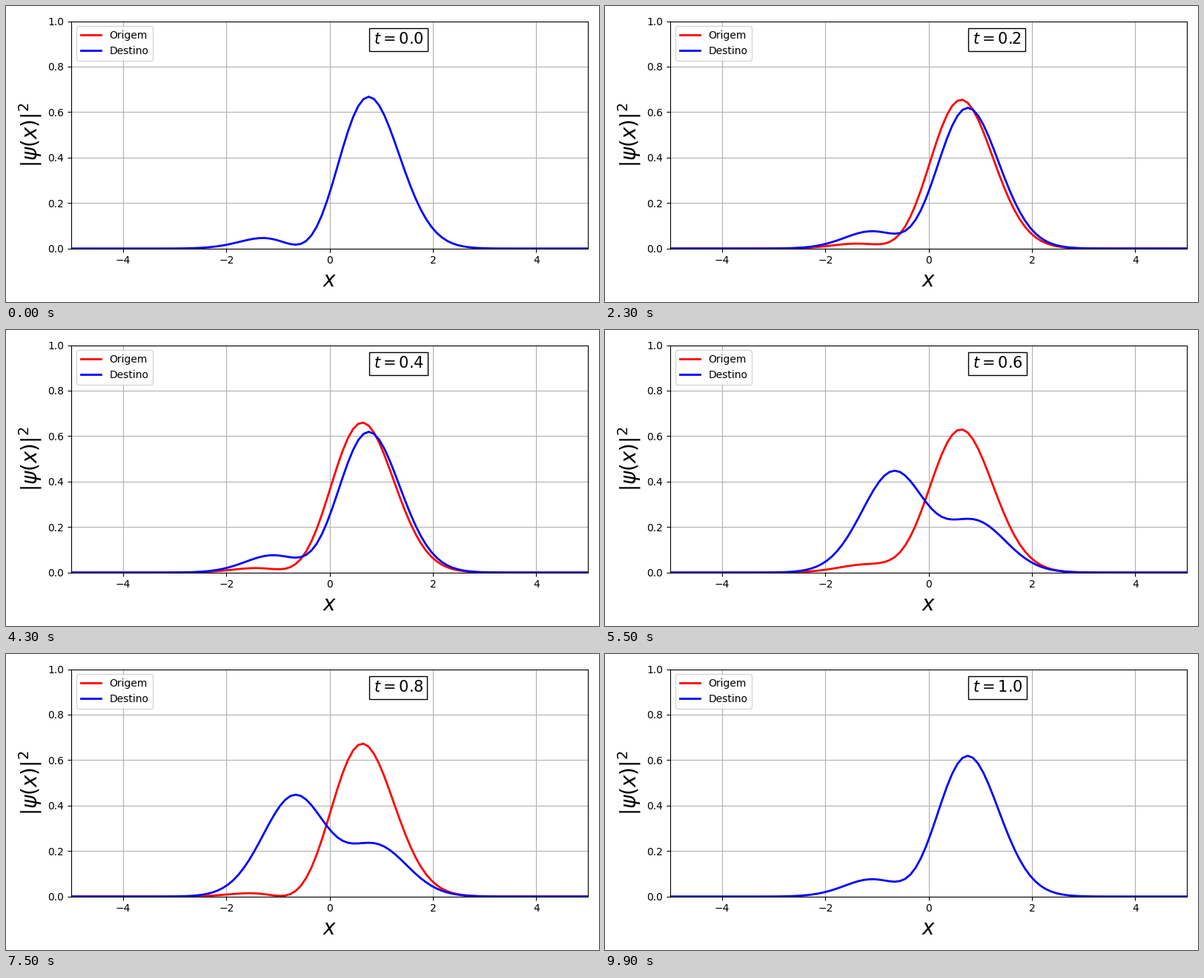
These frames come from a looping animation (800x400 px, 10000 ms). A matplotlib script:

```python
import numpy as np
import matplotlib.pyplot as plt
from matplotlib.animation import FuncAnimation

FRAMES = 100
INTERVAL = 100

x = np.linspace(-5, 5, 100)


def density(u, p0, phase):
    """Density of an oscillator state with ground weight p0, rest excited."""
    psi0 = np.pi ** -0.25 * np.exp(-u ** 2 / 2)
    psi1 = np.sqrt(2) * u * psi0
    psi = np.sqrt(p0) * psi0 + np.sqrt(1 - p0) * np.exp(1j * phase) * psi1
    return np.abs(psi) ** 2


def origin_density(n):
    return density(x, 0.64, np.radians(34.07 * n - 43))


def target_density(n):
    return density(x - x[50], 0.5, (n - 1) * np.pi / 10)


fig, ax = plt.subplots(figsize=(8, 4), dpi=100)
ax.set_xlim(-5, 5)
ax.set_ylim(0, 1)
ax.set_xlabel(r"$x$", fontsize=20)
ax.set_ylabel(r"$|\psi(x)|^2$", fontsize=20)
ax.grid(True)

origin, = ax.plot([], [], color="red", lw=2, label="Origem")
target, = ax.plot([], [], color="blue", lw=2, label="Destino")
ax.legend(loc="upper left")
clock = ax.text(0.85, 0.9, "", fontsize=15, bbox=dict(facecolor="white"))
fig.tight_layout()


def update(n):
    if 0 < n < FRAMES - 1:
        origin.set_data(x, origin_density(n))
    else:
        origin.set_data([], [])
    target.set_data(x, target_density(n))
    clock.set_text(f"$t = {n / FRAMES:.1f}$")
    return origin, target, clock


anim = FuncAnimation(fig, update, frames=FRAMES, interval=INTERVAL,
                     repeat=True, repeat_delay=0)
plt.show()
```
